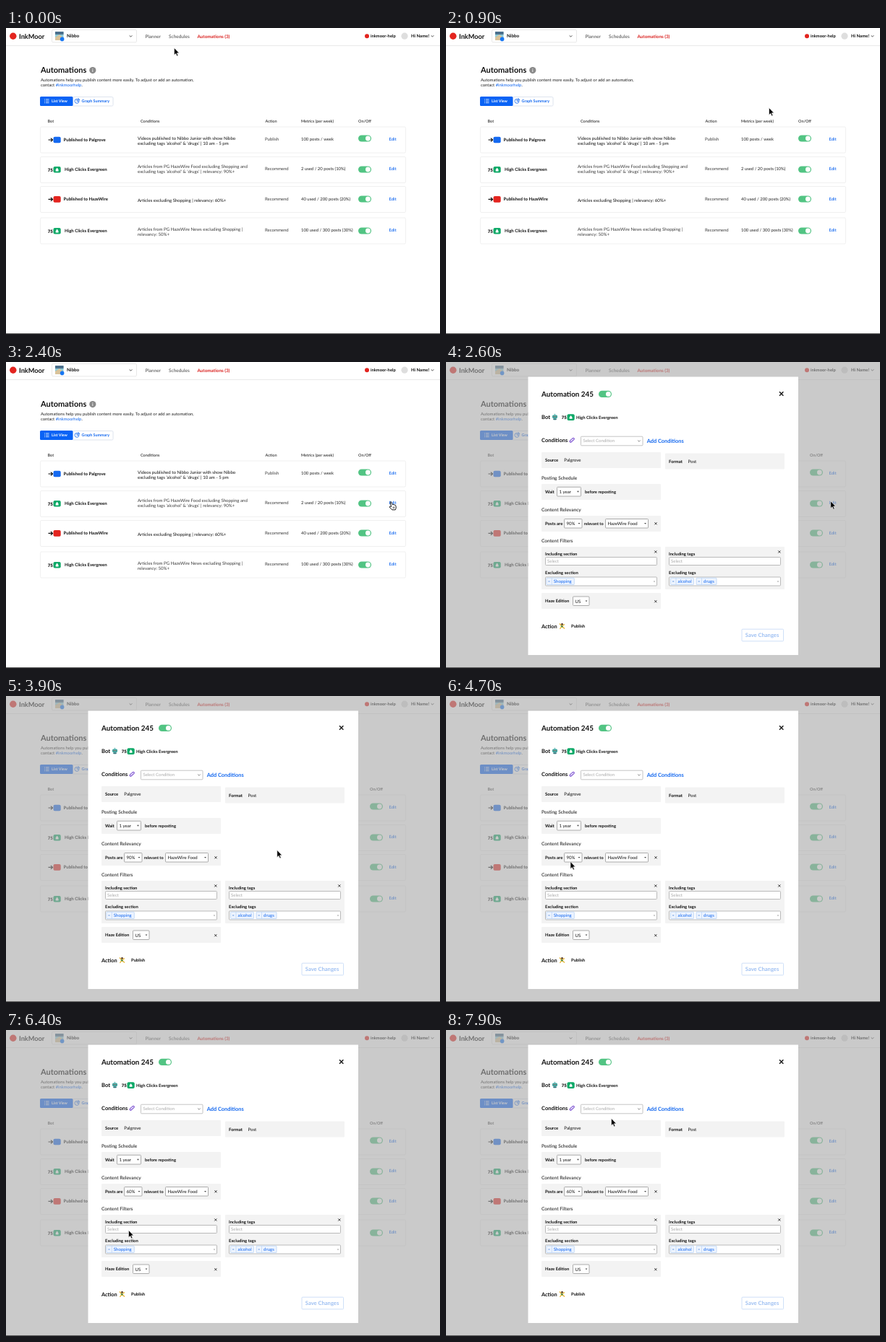
Write an HTML page that moves like this. It is 600 px wide and 424 px high and loops after 8000 ms.

```html
<!DOCTYPE html>
<html lang="en">
<head>
<meta charset="utf-8">
<title>Automations</title>
<style>
html, body { margin: 0; width: 100%; height: 100%; overflow: hidden; background: #fff; }
svg { display: block; width: 600px; height: 424px; }
text { font-family: Lato, "Open Sans", sans-serif; text-rendering: geometricPrecision; white-space: pre; }
</style>
</head>
<body>
<svg id="stage" viewBox="0 0 600 424"></svg>
<script>
const BLUE = '#0f65ef', GREEN = '#0fa968', RED = '#e3241f', INK = '#111', GREY = '#3a3a3a';

// Drawing helpers, each returning SVG markup
const text = (x, y, s, size = 6, weight = 400, fill = INK) =>
  `<text x="${x}" y="${y}" font-size="${size}" font-weight="${weight}" fill="${fill}">${s}</text>`;
const bold = (x, y, s, size = 6, fill = INK) => text(x, y, s, size, 700, fill);
const box = (x, y, w, h, fill, stroke = 'none', r = 0) =>
  `<rect x="${x}" y="${y}" width="${w}" height="${h}" rx="${r}" fill="${fill}" stroke="${stroke}" stroke-width=".8"/>`;
const dot = (x, y, r, fill) => `<circle cx="${x}" cy="${y}" r="${r}" fill="${fill}"/>`;
const line = (d, stroke = INK, width = 1) =>
  `<path d="${d}" fill="none" stroke="${stroke}" stroke-width="${width}"/>`;
const shape = (d, fill) => `<path d="${d}" fill="${fill}"/>`;
const chevron = (x, y, s = 1.8, c = '#333') => line(`M${x - s} ${y - s / 2}l${s} ${s}l${s} ${-s}`, c, .9);
const caret = (x, y, c = '#444') => shape(`M${x - 1.4} ${y - .8}h2.8l-1.4 1.8z`, c);
const cross = (x, y, s, w, c = INK) =>
  line(`M${x - s} ${y - s}l${2 * s} ${2 * s}m0 ${-2 * s}l${-2 * s} ${2 * s}`, c, w);
const toggle = (x, y) => box(x, y - 4.6, 18, 9.2, '#52c483', 'none', 4.6) + dot(x + 13.4, y, 3.4, '#fff');
const select = (x, y, w, h, s) =>
  box(x, y, w, h, '#fff', '#999', 1) + text(x + 3, y + 8.6, s, 6.1) + caret(x + w - 4, y + h / 2);

function badge(x, y, color) {
  const lead = color === GREEN
    ? text(x - 7.3, y + 2.3, '75', 6.1, 900)
    : line(`M${x - 6.5} ${y}h6m-2.6 -2.4l2.6 2.4l-2.6 2.4`, INK, 1.2);
  const glyph = color === GREEN
    ? shape(`M${x + 5.6} ${y - 2.6}l1.900 2.800v2h-3.800v-2z`, '#fff') : '';
  return lead + box(x + .5, y - 4.3, 10.2, 8.6, color, 'none', 2) + glyph;
}

const header = () =>
  line('M0 24.5H600', '#e9e9e9') +
  dot(9.8, 11.2, 4.7, RED) + bold(18, 14.5, 'InkMoor', 9.2) +
  box(63.5, 2.5, 117, 17.3, '#fff', '#e2e2e2', 1.5) +
  box(68, 5, 11.5, 12, '#8ecbd8', 'none', 1) + box(68, 5, 11.5, 4, '#4a6f8c') +
  shape('M68 17v-4l6 -4l5.500 5v3z', '#d9c39a') + dot(77.6, 15.4, 2.8, '#1877f2') +
  bold(84, 13.4, 'Nibbo', 6.3) + chevron(172.500, 11.3) +
  text(192.5, 13.6, 'Planner', 6.4, 500, '#555') +
  text(225, 13.6, 'Schedules', 6.5, 500, '#555') +
  bold(264.5, 13.6, 'Automations (3)', 6.3, '#d9201e') +
  dot(499, 11.3, 3, RED) + bold(504, 13.2, 'inkmoor-help', 5.8) +
  dot(551, 11.2, 4.6, '#dedede') + bold(560, 13.2, 'Hi Name!', 6) + chevron(589.5, 11.2);

const rows = [
  { top: 137, y: 155, icon: '#1569f0', name: 'Published to Palgrove', color: INK, firstLine: 154.6, gap: 7.7,
    rule: ['Videos published to Nibbo Junior with show Nibbo', "excluding tags 'alcohol' &amp; 'drugs' | 10 am - 5 pm"],
    action: 'Publish', metrics: '100 posts / week', on: 153, edit: 156.4 },
  { top: 178.5, y: 196.2, icon: GREEN, name: 'High Clicks Evergreen', color: GREY, firstLine: 193.9, gap: 7.2,
    rule: ['Articles from PG HazeWire Food excluding Shopping and', "excluding tags 'alcohol' &amp; 'drugs' | relevancy: 90%+"],
    action: 'Recommend', metrics: '2 used / 20 posts (10%)', on: 196, edit: 196.7 },
  { top: 219.5, y: 237.4, icon: RED, name: 'Published to HazeWire', color: INK, firstLine: 240.9, gap: 7,
    rule: ['Articles excluding Shopping | relevancy: 60%+'],
    action: 'Recommend', metrics: '40 used / 200 posts (20%)', on: 237, edit: 239.1 },
  { top: 263, y: 281.2, icon: GREEN, name: 'High Clicks Evergreen', color: GREY, firstLine: 281.2, gap: 7,
    rule: ['Articles from PG HazeWire News excluding Shopping |', 'relevancy: 50%+'],
    action: 'Recommend', metrics: '100 used / 300 posts (30%)', on: 281, edit: 282.2 },
];

const row = (r, shift) =>
  box(47.5, r.top, 505, 36, '#fff', '#ececec', 1.5) + badge(65, r.y, r.icon) +
  bold(r.icon === GREEN ? 81 : 79.5, r.y + 2, r.name, 6.05) +
  r.rule.map((s, i) => text(182, r.firstLine + i * r.gap, s, 6.1, 400, r.color)).join('') +
  text(358, r.edit, r.action, 6, 400, GREY) +
  text(408, r.edit, r.metrics, 5.9, 400, '#222') +
  toggle(487 + shift, r.on) + text(529.5, r.edit, 'Edit', 5.8, 600, BLUE);

const page = shift =>
  box(0, 0, 600, 424, '#fff') + header() +
  bold(48, 62.4, 'Automations', 11) + dot(119.8, 58.6, 4.6, '#8a8a8a') +
  bold(118.9, 61, 'i', 6.5, '#fff') +
  text(48, 74, 'Automations help you publish content more easily. To adjust or add an automation,', 5.87, 400, '#222') +
  text(48, 81.2, `contact <tspan fill="${BLUE}">#inkmoorhelp</tspan>.`, 5.87, 400, '#222') +
  box(92, 95.5, 56, 12.5, '#fff', '#d5dcea', 1.5) + box(47, 95, 45.5, 13, '#0a63f5', 'none', 1.5) +
  line('M53 99h1m1 0h4.500M53 101.300h1m1 0h4.500M53 103.600h1m1 0h4.500', '#fff', .8) +
  bold(63, 103.4, 'List View', 5.4, '#fff') +
  line('M98 98.300a3 3 0 1 0 3 3h-3zM99.500 97.700a2.500 2.500 0 0 1 2.300 2.300h-2.300z', BLUE, .8) +
  bold(104.6, 103.4, 'Graph Summary', 5.4, BLUE) +
  [[57.5, 'Bot'], [186, 'Conditions'], [358.5, 'Action'], [408, 'Metrics (per week)'], [487 + shift, 'On/Off']]
    .map(([x, s]) => text(x, 130.8, s, 5.5, 600, '#333')).join('') +
  rows.map(r => row(r, shift)).join('');

const panel = (x, y, h) => box(x, y, 165, h, '#f3f3f3', 'none', 1);
const tag = (x, w, s) =>
  box(x, 299.2, w, 9.4, '#edf4ff', '#b9d3f5', 1) + line(`M${x + 7.500} 299.200v9.400`, '#b9d3f5', .7) +
  cross(x + 3.7, 304, 1, .6, '#6a9be0') + text(x + 10, 306, s, 6.1, 400, BLUE);
const filter = (x, kind, tags) =>
  panel(x, 256, 59) + cross(x + 157.8, 263, 1.6, .8) +
  bold(x + 5, 267.6, `Including ${kind}`, 5.9) +
  box(x + 5.5, 270.5, 154, 11, '#fff', '#aaa', 1) + text(x + 8, 278.2, 'Select', 6, 400, '#aaa') +
  bold(x + 5, 294.3, `Excluding ${kind}`, 5.9) +
  box(x + 5.5, 298, 154, 12, '#fff', '#aaa', 1) + tags + caret(x + 156, 304.2, '#aaa');

const modal = () =>
  page(16) + box(0, 0, 600, 424, 'rgba(170,170,170,.62)') + box(113.5, 20.5, 373.5, 385.500, '#fff') +
  bold(132, 47.6, 'Automation 245', 9.9) + toggle(211, 44.4) + cross(463.7, 44, 2.7, 1.3) +
  bold(132, 79, 'Bot', 7.6) +
  box(147, 73.5, 7, 4.5, '#3aa6a0', 'none', 1.5) + box(148.2, 78.3, 4.6, 2, '#31757c', 'none', .8) +
  line('M150.500 73.500v-1.700', '#3aa6a0') + dot(149.2, 75.6, .7, '#e8554d') + dot(151.8, 75.6, .7, '#e8554d') +
  badge(167, 76.6, GREEN) + bold(180, 78.7, 'High Clicks Evergreen', 5.95) +
  bold(132, 111, 'Conditions', 7.5) +
  line('M173.500 107.300l1.700 -1.700a1.200 1.200 0 0 1 1.700 1.700l-1.800 1.800M174.900 109l-1.700 1.800a1.200 1.200 0 0 1 -1.700 -1.700l1.700 -1.800', '#7a4fd0', 1.2) +
  box(186.5, 103.2, 85.5, 12.6, '#fff', '#b5b5b5', 1) + text(189.5, 111.4, 'Select Condition', 6, 400, '#aaa') +
  chevron(267, 109.4, 1.8, '#777') + bold(277.8, 112.2, 'Add Conditions', 7.4, BLUE) +
  panel(132, 125, 22) + bold(137, 138.2, 'Source') + text(163.3, 138.2, 'Palgrove', 6.2) +
  panel(303, 126.5, 22) + bold(308, 139.5, 'Format') + text(334.5, 139.5, 'Post', 6.1) +
  text(132, 162.8, 'Posting Schedule', 6.5, 600, '#333') +
  panel(132, 169, 22) + bold(137, 181.9, 'Wait') + select(153.5, 173.3, 33, 12.7, '1 year') +
  bold(192, 181.9, 'before reposting', 5.85) +
  text(132, 206.8, 'Content Relevancy', 6.6, 600, '#333') +
  panel(132, 213, 22) + bold(137, 225.9, 'Posts are') + bold(190.8, 225.9, 'relevant to', 5.6) +
  select(220.5, 217.5, 59, 12.5, 'HazeWire Food') + cross(290, 223.8, 1.6, .8) +
  text(132, 250.3, 'Content Filters', 6.6, 600, '#333') +
  filter(132, 'section', tag(138.8, 38.5, 'Shopping')) +
  filter(303, 'tags', tag(310.5, 32, 'alcohol') + tag(346, 28, 'drugs')) +
  panel(132, 320, 22) + bold(137, 333.2, 'Haze Edition', 5.9) + select(175.5, 325, 22.5, 12.5, 'US') +
  cross(289.8, 331.7, 1.6, .8) +
  bold(132, 368.8, 'Action', 7.4) +
  line('M157 362.500l3 3.500l-2.500 4M160 366l4 3.500M160 366l4 -2.500', '#e9b52c', 1.3) +
  dot(160.5, 363.3, 1.4, '#5a3b22') + line('M159 365.500l2.500 1.500', '#3d8f5d', 1.8) +
  bold(173, 368.3, 'Publish', 5.9) +
  box(409, 370.2, 57.5, 16.6, '#fff', '#c3d8f7', 1) + bold(413.8, 381.3, 'Save Changes', 7.6, '#9dbff2');

const percentList = () => box(162.5, 217.3, 26.2, 92.5, '#fff', '#999', 1) +
  [90, 80, 70, 60, 50].map((n, i) => text(166.500, 228.3 + i * 18.600, n + '%', 6.1)).join('');

const arrow = '<path d="M-.5 -.5V9.400L1.800 7.400L3.400 11L5 10.300L3.400 6.800H6.400Z" fill="#000" stroke="#fff" stroke-width=".6"/>';
const hand = '<path d="M-1 1.200Q0 -.1 .8 1.200L2.200 4.600Q3.200 3.800 3.900 4.700Q4.900 4.200 5.500 5.100Q6.600 4.900 6.800 6.200L7.100 9.200L6.100 11.700H1.700L-2 7.900Q-1.800 6.500 -.4 7L.5 7.400Z" fill="#fff" stroke="#000" stroke-width=".9"/>' +
  line('M3 7.500v2.500M4.500 7.300v2.600', '#000', .6);

// Pointer stops: time, x, y
const stops = [
  [0, 233, 28], [900, 447, 111], [1200, 469, 136], [1300, 469, 136], [1600, 507, 176], [1700, 507, 176],
  [2100, 532, 193], [3200, 532.5, 193.5], [3500, 467.500, 206], [3800, 467.500, 206], [4000, 283, 222],
  [4200, 283, 222], [4700, 172.5, 230], [5000, 175, 227], [5400, 175, 227], [6300, 170, 278],
  [6700, 170, 278], [7100, 205, 162], [7300, 205, 162], [7900, 229, 123], [8000, 229, 123],
];
function pointer(t) {
  const i = stops.findIndex(s => s[0] > t);
  const [t0, x0, y0] = stops[i - 1], [t1, x1, y1] = stops[i];
  const k = (t - t0) / (t1 - t0);
  return [x0 + (x1 - x0) * k, y0 + (y1 - y0) * k];
}

const stage = document.getElementById('stage');
stage.innerHTML =
  `<g id="list">${page(0)}</g><g id="dialog">${modal()}<g id="value"></g></g><g id="menu">${percentList()}</g>` +
  box(0, 423, 600, 1, '#555') + `<g id="cursor"><g id="arrow">${arrow}</g><g id="hand">${hand}</g></g>`;
const part = id => document.getElementById(id);
const show = (id, on) => part(id).style.display = on ? '' : 'none';
let last = -1;

function frame(now) {
  const t = Math.floor(now % 8000 / 100) * 100;
  if (t !== last) {
    last = t;
    const [x, y] = pointer(t), pointing = t >= 2300 && t < 2600;
    show('list', t < 2600);
    show('dialog', t >= 2600);
    show('menu', t >= 5200 && t < 6400);
    show('arrow', !pointing);
    show('hand', pointing);
    part('value').innerHTML = select(163.5, 217.5, 24.5, 12.5, t < 6400 ? '90%' : '60%');
    part('cursor').setAttribute('transform', `translate(${x} ${y})`);
  }
  requestAnimationFrame(frame);
}
frame(0);
</script>
</body>
</html>
```
